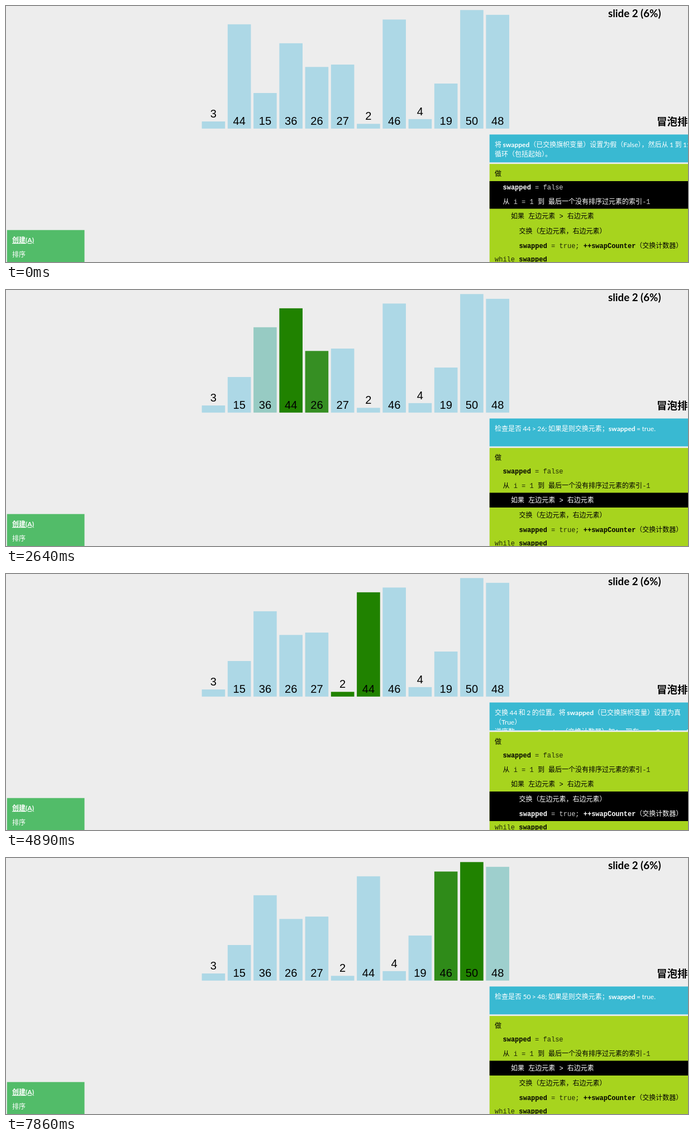
Recreate the animation shown at these times as an HTML page. Size 1221 px wide and 459 px high, loop 8 s.

```html
<!DOCTYPE html>
<html lang="zh-CN">
<head>
<meta charset="utf-8">
<title>冒泡排序</title>
<style>
  html, body { margin: 0; width: 100%; height: 100%; overflow: hidden; background: #ededed; }
  svg { display: block; width: 1221px; height: 459px; }
  text { font: 12px Lato, "Noto Sans CJK SC", "Noto Sans CJK", sans-serif; }
  .b { font-weight: 700; }
  #bars text { font: 20px "Liberation Sans", sans-serif; text-anchor: middle; }
  #message text { word-spacing: -.6px; }
  #code text { font-family: "Liberation Mono", "Noto Sans CJK SC", "Noto Sans CJK", monospace; }
  #code .m { fill-opacity: .8; }
  .slide { font-size: 18.7px; font-weight: 700; }
  .title { font-size: 18.5px; font-weight: 700; }
  .light { fill: #fff; }
</style>
</head>
<body>
<svg viewBox="0 0 1221 459">
  <clipPath id="panel"><rect x="865.7" y="230.4" width="356" height="50"/></clipPath>
  <g id="bars"></g>
  <text class="slide" x="1078" y="20">slide 2 (6%)</text>
  <text class="title" x="1165" y="214">冒泡排序</text>
  <rect x="865.7" y="230.4" width="356" height="50" fill="#39b9d2"/>
  <g id="message" class="light" clip-path="url(#panel)"></g>
  <rect x="865.7" y="283.2" width="356" height="176" fill="#a7d41e"/>
  <rect id="mark" x="865.7" width="356"/>
  <g id="code"></g>
  <rect x="1.8" y="401.7" width="138.7" height="58" fill="#52bc69"/>
  <g class="light">
    <text class="b" x="11" y="424" text-decoration="underline">创建(A)</text>
    <text x="11" y="450">排序</text>
  </g>
</svg>
<script>
const values = [3, 44, 15, 36, 26, 27, 2, 46, 4, 19, 50, 48];
const PITCH = 46.25, BASE = 219.8, UNIT = 4.25, BAR = 41.6;
const LOOP = 8000, TICK = 148.6;                 // the picture refreshes once per tick
const START = 97.5, STEP = 452.6, MOVE = 245;    // timing of the sorting steps
const BLUE = [173, 216, 230], GREEN = [32, 130, 0];

const $ = id => document.getElementById(id);
const bold = s => `<tspan class="b">${s}</tspan>`;
const mono = s => `<tspan class="m">${s}</tspan>`;
const lerp = (a, b, p) => a + (b - a) * p;
const ease = p => p < .5 ? 4 * p ** 3 : 1 - 4 * (1 - p) ** 3;

// Code lines: indent level, baseline, content
const lines = [
  [0, 305, '做'],
  [1, 329, bold('swapped') + mono(' = false')],
  [1, 355, `从 ${mono('i = 1')} 到 最后一个没有排序过元素的索引${mono('-1')}`],
  [2, 381, '如果 左边元素 &gt; 右边元素'],
  [3, 408, '交换（左边元素，右边元素）'],
  [3, 434, bold('swapped') + mono(' = true; ') + bold('++swapCounter') + '（交换计数器）'],
  [0, 458, mono('while ') + bold('swapped')]
];
$('code').innerHTML = lines.map(([level, y, s]) =>
  `<text x="${875 + level * 14.5}" y="${y}">${s}</text>`).join('');
const codeTexts = [...$('code').children];

// Highlighted code: first line, last line, top, bottom
const marks = { init: [1, 2, 314, 363.5], check: [3, 3, 363.5, 390], swap: [4, 5, 390, 443] };

$('bars').innerHTML = values.map(v => {
  const h = v * UNIT, y = v < 10 ? BASE - h - 7 : 213;
  return `<g><rect y="${BASE - h}" width="${BAR}" height="${h}"/>` +
    `<text x="${BAR / 2}" y="${y}">${v}</text></g>`;
}).join('');
const bars = [...$('bars').children];

// One pass of bubble sort, recorded step by step
function record() {
  const order = values.map((_, i) => i);
  const states = [];
  const add = (kind, pair, message) => states.push({
    kind, pair, message, slots: values.map((_, i) => order.indexOf(i))
  });
  add('init', [], [
    `将 ${bold('swapped')}（已交换旗帜变量）设置为假（False），然后从 1 到 11`,
    '循环（包括起始）。'
  ]);
  let swaps = 0;
  for (let i = 0; i + 1 < order.length; i++) {
    const pair = [order[i], order[i + 1]];
    const [a, b] = pair.map(k => values[k]);
    add('check', pair, [`检查是否 ${a} &gt; ${b}; 如果是则交换元素；${bold('swapped')} = true.`]);
    if (a <= b) continue;
    [order[i], order[i + 1]] = [order[i + 1], order[i]];
    add('swap', pair, [
      `交换 ${a} 和 ${b} 的位置。将 ${bold('swapped')}（已交换旗帜变量）设置为真`,
      '（True）',
      `逆序数，${bold('swapCounter')}（交换计数器）加1。现在 swapCounter = ${++swaps}.`
    ]);
  }
  return states;
}
const states = record();
let shown;

function showState(state) {
  if (shown === state) return;
  shown = state;
  $('message').innerHTML = state.message.map((s, i) =>
    `<text x="875" y="${253 + i * 16.9}">${s}</text>`).join('');
  const [first, last, top, bottom] = marks[state.kind];
  $('mark').setAttribute('y', top);
  $('mark').setAttribute('height', bottom - top);
  codeTexts.forEach((t, i) => t.classList.toggle('light', i >= first && i <= last));
}

function draw(now) {
  const clock = Math.floor((now % LOOP + 28) / TICK) * 148.4 - START;
  const n = Math.min(Math.max(Math.floor(clock / STEP) + 1, 0), states.length - 1);
  const to = states[n], from = states[Math.max(n - 1, 0)];
  const p = n ? ease(Math.min((clock - (n - 1) * STEP) / MOVE, 1)) : 1;
  showState(to);
  bars.forEach((bar, i) => {
    const x = 350.6 + PITCH * lerp(from.slots[i], to.slots[i], p);
    const heat = lerp(+from.pair.includes(i), +to.pair.includes(i), p);
    bar.setAttribute('transform', `translate(${x})`);
    bar.firstChild.setAttribute('fill',
      `rgb(${BLUE.map((c, j) => Math.round(lerp(c, GREEN[j], heat)))})`);
  });
}

let begin;
function frame(now) {
  begin ??= now;
  draw(now - begin);
  requestAnimationFrame(frame);
}
draw(0);
requestAnimationFrame(frame);
</script>
</body>
</html>
```
